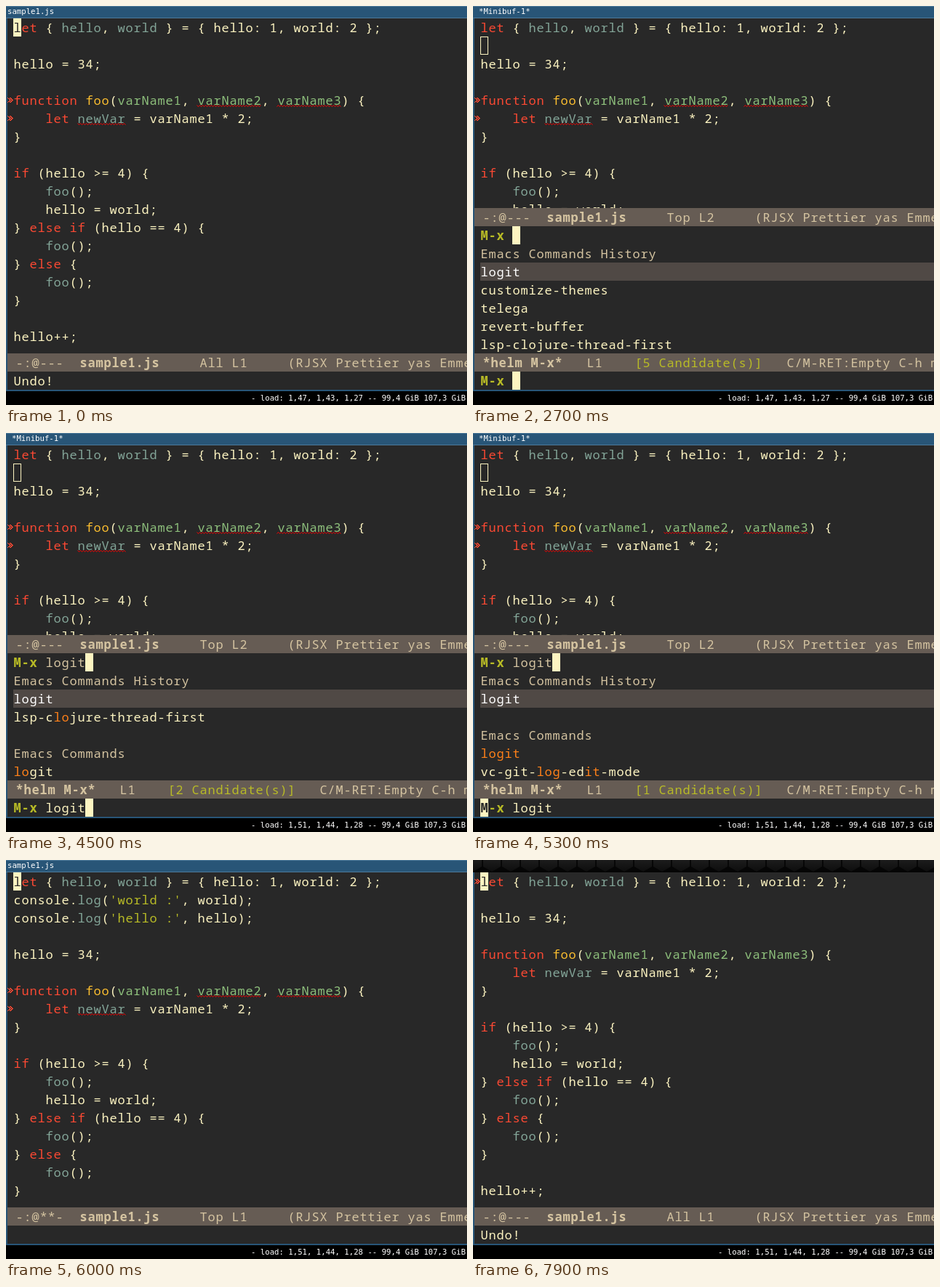
An HTML page with a canvas for the animation above (8 s loop, 634 by 549 pixels).

```html
<!DOCTYPE html>
<html lang="en">
<meta charset="utf-8">
<title>Editor session</title>
<style>
html, body { margin: 0; height: 100%; overflow: hidden; background: #000; }
canvas { display: block; }
</style>
<canvas id="stage" width="634" height="549"></canvas>
<script>
const ctx = document.getElementById('stage').getContext('2d');
const W = 634, LOOP = 8000, CELL = 11, ROW = 25, LEFT = 10, TOP = 17;
const MONO = '17px "Noto Sans Mono", monospace';
const SMALL = '10.667px "DejaVu Sans Mono", monospace';
const BG = '#282828', FG = '#fdf4c1', DIM = '#d5c4a1', BAR = '#665c54',
      HILITE = '#504945', FRAME = '#285577', EDGE = '#4c7899', RED = '#fb4933';

// "~x" inside a string switches the colour
const COLORS = { w: FG, r: RED, b: '#83a598', g: '#8ec07c', y: '#fabd2f',
                 s: '#b8bb26', o: '#fe8019', d: DIM, k: BG, h: '#ffffff' };

const CODE = [
  '~rlet~w { ~bhello~w, ~bworld~w } = { hello: 1, world: 2 };',
  '',
  'hello = 34;',
  '',
  '~rfunction ~yfoo~w(~gvarName1~w, ~gvarName2~w, ~gvarName3~w) {',
  '    ~rlet ~bnewVar~w = varName1 * 2;',
  '}',
  '',
  '~rif~w (hello >= 4) {',
  '    ~bfoo~w();',
  '    hello = world;',
  '} ~relse if~w (hello == 4) {',
  '    ~bfoo~w();',
  '} ~relse~w {',
  '    ~bfoo~w();',
  '}',
  '',
  'hello++;'
];
const LOGS = ['world', 'hello'].map(v => `console.~blog~w(~s'${v} :'~w, ${v});`);
const LOGGED = [CODE[0], ...LOGS, ...CODE.slice(1, 16)];

const HISTORY = '~dEmacs Commands History', COMMANDS = '~dEmacs Commands';
const CANDIDATES = [
  [0, 5, [HISTORY, '~hlogit', 'customize-themes', 'telega', 'revert-buffer', 'lsp-clojure-thread-first']],
  [3800, 2, [HISTORY, '~hlogit', 'lsp-c~olo~wjure-thread-first', '', COMMANDS, '~olo~wgit']],
  [4600, 1, [HISTORY, '~hlogit', '', COMMANDS, '~ologit', 'vc-git-~olog~w-ed~oit~w-mode']]
];
const KEY_TIMES = [3400, 3600, 4300, 4400, 4500];

function rect(color, x, y, w, h) {
  ctx.fillStyle = color;
  ctx.fillRect(x, y, w, h);
}

function text(markup, x, top, { bold = false, color = 'w' } = {}) {
  ctx.font = (bold ? 'bold ' : '') + MONO;
  const gap = CELL - ctx.measureText('0').width;
  ctx.letterSpacing = `${gap}px`;
  markup.split(/(~[a-z])/).forEach(part => {
    if (part[0] === '~') { color = part[1]; return; }
    ctx.fillStyle = COLORS[color];
    ctx.fillText(part, x + gap / 2, top + 19);
    x += part.length * CELL;
  });
  ctx.letterSpacing = '0px';
}

function small(string, x, baseline) {
  ctx.font = SMALL;
  ctx.fillStyle = '#fff';
  ctx.fillText(string, x, baseline);
}

function cursor(col, top, char = '', bold = false) {
  const x = LEFT + col * CELL;
  rect(FG, x, top, CELL, ROW);
  text(char, x, top, { bold, color: 'k' });
}

function wave(col, length, row) {
  const start = LEFT + col * CELL, end = start + length * CELL;
  const y = TOP + row * ROW + 19.5;
  ctx.beginPath();
  for (let x = start - start % 2; x <= end; x += 2) ctx.lineTo(x + 0.5, y + (x + 2) % 4);
  ctx.strokeStyle = '#f00';
  ctx.lineWidth = 1;
  ctx.stroke();
}

function fringeArrow(row) {
  for (let i = 0; i < 7; i++) {
    const step = 3 - Math.abs(3 - i), y = TOP + row * ROW + 9 + i;
    rect(RED, 2 + step, y, step ? 2 : 1, 1);
    rect(RED, 5 + step, y, 2, 1);
  }
}

function lintMarks(row) {
  fringeArrow(row);
  fringeArrow(row + 1);
  wave(23, 8, row);
  wave(33, 8, row);
  wave(8, 6, row + 1);
}

function modeLine(top, state, position) {
  rect(BAR, 2, top, W, ROW);
  text(`-:@${state}`, 13, top, { color: 'd' });
  text('sample1.js', 101, top, { bold: true, color: 'd' });
  text(`${position}     (RJSX Prettier yas Emmet`, 266, top, { color: 'd' });
}

function prompt(input, top, color, atStart) {
  text('M-x', LEFT, top, { bold: true, color: 's' });
  text(input, LEFT + 4 * CELL, top, { color });
  if (atStart) cursor(0, top, 'M', true);
  else cursor(4 + input.length, top);
}

function helm(t) {
  const [, count, lines] = CANDIDATES.findLast(c => t >= c[0]);
  const input = 'logit'.slice(0, KEY_TIMES.filter(k => t >= k).length);
  rect(BG, 2, 278, W, 250);
  modeLine(278, '---', 'Top L2');
  prompt(input, 303, 'd');
  rect(HILITE, LEFT, 353, W, ROW);
  lines.forEach((line, i) => text(line, LEFT, 328 + i * ROW));
  rect(BAR, 2, 478, W, ROW);
  text('*helm M-x*', 13, 478, { bold: true, color: 'd' });
  text(`L1    ~s[${count} Candidate(s)]~d   C/M-RET:Empty C-h m:Help`, 156, 478, { color: 'd' });
  prompt(input, 503, 'w', t >= 5300);
}

function titleBar(title, x) {
  rect(EDGE, 0, 0, W, 1);
  rect(EDGE, 0, TOP - 1, W, 1);
  small(title, x, 11);
}

function wallpaper() {
  rect('#050505', 0, 0, W, TOP);
  ctx.save();
  ctx.beginPath();
  ctx.rect(0, 0, W, TOP);
  ctx.clip();
  const shade = ctx.createLinearGradient(0, 0, 0, TOP);
  shade.addColorStop(0, '#1c1c1c');
  shade.addColorStop(1, '#0c0c0c');
  ctx.fillStyle = shade;
  for (let x = 0; x < W + 26; x += 26) {
    ctx.beginPath();
    for (let a = 0; a < 6; a++) {
      const angle = (a + 0.5) * Math.PI / 3;
      ctx.lineTo(x + 14 * Math.cos(angle), 2 + 14 * Math.sin(angle));
    }
    ctx.fill();
  }
  ctx.restore();
}

function draw(t) {
  const inHelm = t >= 2700 && t < 5700;
  const edited = t >= 5700 && t < 7600;
  const undone = t >= 7600;
  const onSecondLine = t >= 1500 && t < 5700;

  rect(FRAME, 0, 0, W, 530);
  rect(BG, 2, TOP, W, 511);
  if (t >= 7900) wallpaper();
  else if (inHelm) titleBar('*Minibuf-1*', 8);
  else titleBar('sample1.js', 2);

  if (onSecondLine && !inHelm) rect(HILITE, LEFT, TOP, W, ROW);
  const plain = edited && t < 5900;
  (edited ? LOGGED : CODE).forEach((line, i) =>
    text(plain ? line.replace(/~[a-z]/g, '') : line, LEFT, TOP + i * ROW));

  if (undone || edited && t < 6000) fringeArrow(0);
  else lintMarks(edited ? 6 : 4);

  if (inHelm) {
    ctx.strokeStyle = FG;
    ctx.lineWidth = 1;
    ctx.strokeRect(LEFT + 0.5, TOP + ROW + 0.5, CELL - 1, ROW - 1);
    helm(t);
  } else {
    if (onSecondLine) cursor(0, TOP + ROW);
    else cursor(0, TOP, 'l');
    modeLine(478, edited ? '**-' : '---', `${edited ? 'Top' : 'All'} L${onSecondLine ? 2 : 1}`);
    const message = t < 1100 || undone ? 'Undo!' : t < 1500 ? 'Mark set' : '';
    text(message, LEFT, 503);
  }

  rect(FRAME, 0, 528, W, 2);
  rect('#000', 0, 530, W, 19);
  const load = t < 3700 ? '1,47, 1,43, 1,27' : '1,51, 1,44, 1,28';
  small(`- load: ${load} -- 99,4 GiB 107,3 GiB`, 337, 543);
}

function tick() {
  draw(performance.now() % LOOP);
  requestAnimationFrame(tick);
}
tick();
</script>
</html>
```
